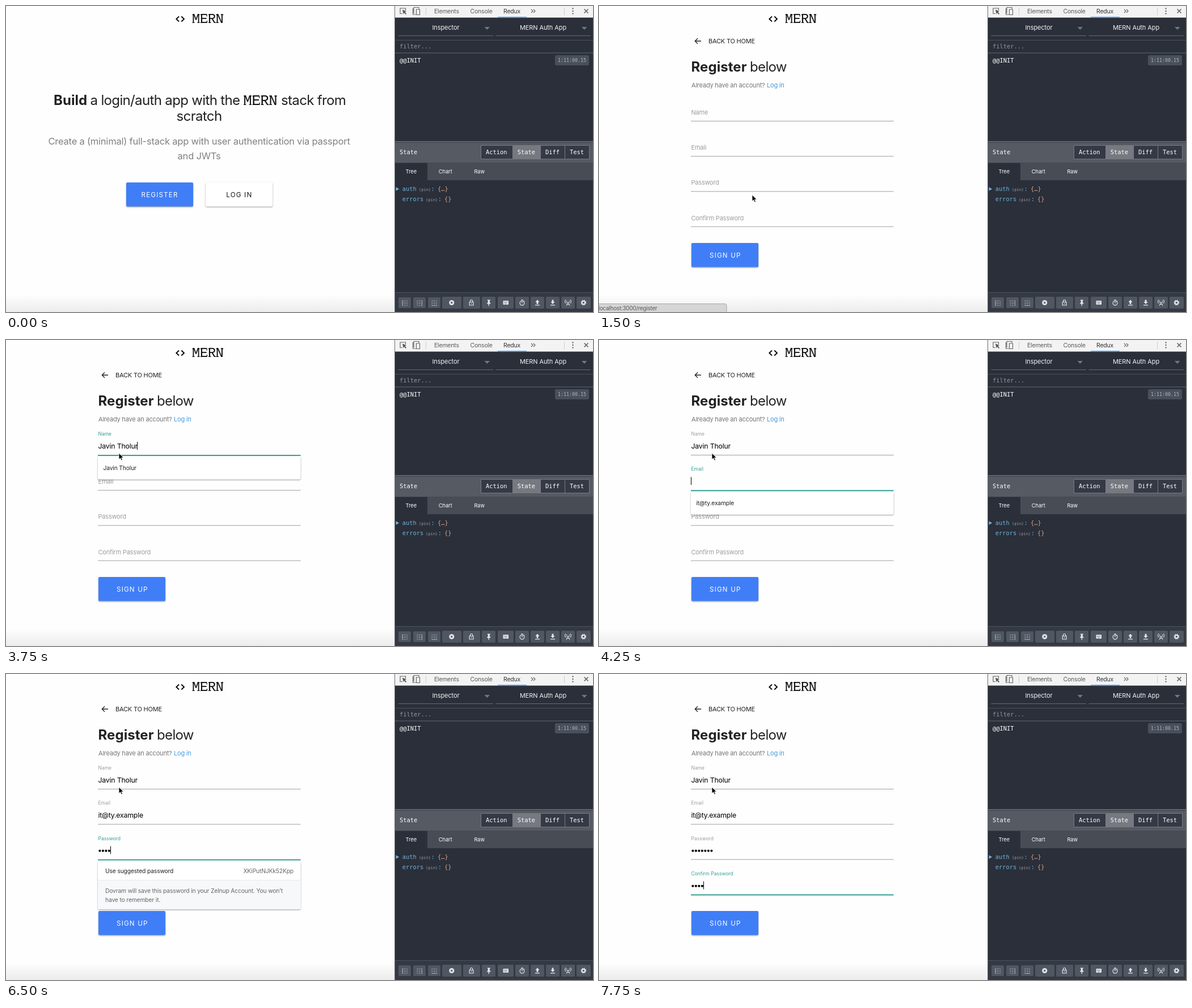
Animation of 1035 by 541 pixels, one loop 8000 ms. Source, as an HTML page:

```html
<!DOCTYPE html>
<html lang="en">
<head>
<meta charset="utf-8">
<title>Register demo</title>
<style>
html, body { margin: 0; width: 100%; height: 100%; overflow: hidden; background: #fefefe; }
svg { display: block; width: 100vw; height: 100vh; }
text { font-family: Inter, "Open Sans", sans-serif; font-optical-sizing: none; white-space: pre; }
.mid { text-anchor: middle; }
.end { text-anchor: end; }
.logo { font: 25px "Liberation Mono", monospace; fill: #111; }
.title { font-size: 24px; letter-spacing: -.027em; fill: #212121; }
.bold { font-weight: 700; letter-spacing: .003em; }
.sub { font-size: 16.5px; letter-spacing: -.0125em; fill: #808080; }
.btn { font-size: 11.6px; letter-spacing: 1.2px; fill: #fff; }
.small { font-size: 11px; letter-spacing: -.2px; fill: #757575; }
.card { fill: #fff; filter: drop-shadow(0 1px 1px #0004) drop-shadow(0 1px 1px #0002); }
.blue { fill: #407ef7; }
.hover { filter: drop-shadow(0 2px 2px #0004) drop-shadow(0 2px 4px #0003); }
.label { fill: #9e9e9e; }
.value { font-size: 12.3px; letter-spacing: -.2px; fill: #000; }
.hint { font-size: 10.3px; letter-spacing: -.15px; fill: #202124; }
.grey { fill: #63676c; }
.rule { stroke: #9e9e9e; }
.focus .rule { stroke: #35a096; stroke-width: 2; }
.focus .label { fill: #35a096; }
.up .label { font-size: 8.5px; letter-spacing: 0; }
.tab { font-size: 10.5px; letter-spacing: -.2px; fill: #5a5a5a; }
.head { font-size: 11px; letter-spacing: -.1px; fill: #f2f2f2; }
.view { font-size: 9.2px; fill: #fff; }
.mono text { font: 10.4px "DejaVu Sans Mono", monospace; fill: #fff; }
.mono .pin { font-size: 7px; fill: #9a9ea6; }
.mono .key { fill: #6fb3d9; }
.mono .obj { fill: #d9a184; }
.mono .dim { fill: #92969e; }
.mono .time { font-size: 8.3px; fill: #b0b4bb; }
.line { fill: none; stroke: currentColor; }
</style>
</head>
<body>
<svg viewBox="0 0 1035 541" preserveAspectRatio="none">
  <defs>
    <linearGradient id="fade" x2="0" y2="1">
      <stop stop-color="#fefefe"/><stop offset="1" stop-color="#ececec"/>
    </linearGradient>
    <g id="mern">
      <text class="logo">MERN</text>
      <path d="M.5-.7h4.5m5 0h4.5M.5-15.8h3m8 0h3M16-.7h2.5M16-15.8h2.5M28.4-.7v-3.5M28-15.8v3.5
        M31-.7h5m6 0h3M31-15.8h2.500M45.500-.7h5M45.500-15.8h2.500m6.500 0h5" class="line" color="#111" stroke-width="1.300"/>
    </g>
  </defs>
  <rect width="686" height="541" fill="#fefefe"/>
  <rect y="510" width="686" height="31" fill="url(#fade)"/>
  <path d="M305 18.5L300.3 23l4.7 4.5M309.3 18.5L314 23l-4.7 4.5" class="line" stroke-width="1.8"/>
  <use href="#mern" transform="translate(328 30) scale(.93)"/>

  <g id="home">
    <text x="84" y="175" class="title bold">Build</text>
    <text x="148.5" y="175" class="title">a login/auth app with the</text>
    <use href="#mern" x="418.5" y="175"/>
    <text x="485" y="175" class="title">stack from</text>
    <text x="340.5" y="203" class="title mid">scratch</text>
    <text x="340.5" y="245" class="sub mid">Create a (minimal) full-stack app with user authentication via passport</text>
    <text x="340.5" y="271" class="sub mid">and JWTs</text>
    <rect id="go" x="212" y="312" width="118" height="42.5" rx="2" class="card blue"/>
    <text x="238.5" y="338" class="btn">REGISTER</text>
    <rect x="352" y="312" width="118" height="42.5" rx="2" class="card"/>
    <text x="388.3" y="338" class="btn" style="fill:#111">LOG IN</text>
  </g>

  <g id="form">
    <path d="M180 62H169.5M174 57.3L169.3 62l4.7 4.7" class="line" color="#222" stroke-width="1.3"/>
    <text x="193" y="66.3" class="small" style="fill:#222">BACK TO HOME</text>
    <text x="162.5" y="116" class="title bold">Register</text>
    <text x="266" y="116" class="title">below</text>
    <text x="163" y="144.3" class="small">Already have an account?</text>
    <text x="296" y="144.3" class="small" style="fill:#459bdc">Log in</text>
    <g id="fields"></g>
    <rect x="163" y="419" width="118" height="42.5" rx="2" class="card blue"/>
    <text x="195" y="444.7" class="btn">SIGN UP</text>
    <g id="popups">
      <g>
        <rect x="162" y="206" width="357.5" height="40.5" rx="2" class="card"/>
        <text x="171.5" y="230" class="hint">Javin Tholur</text>
      </g>
      <g>
        <rect x="162" y="268.2" width="357.5" height="40.5" rx="2" class="card"/>
        <text x="171.5" y="292.2" class="hint">it@ty.example</text>
      </g>
      <g>
        <rect x="162" y="331" width="357.5" height="85" rx="2" class="card"/>
        <path d="M162 365h357.5v49a2 2 0 0 1-2 2h-353.5a2 2 0 0 1-2-2z" fill="#f7f8f9"/>
        <path d="M162 364.5h357.5" class="line" color="#e8e8e8"/>
        <text x="175" y="351.5" class="hint">Use suggested password</text>
        <text x="507" y="351.5" class="hint grey end">XKiPutNJKk52Kpp</text>
        <text x="175" y="387" class="hint grey">Dovram will save this password in your Zelnup Account. You won’t</text>
        <text x="175" y="402.7" class="hint grey">have to remember it.</text>
      </g>
    </g>
  </g>

  <g id="status">
    <path d="M-1 526.5H222a3 3 0 0 1 3 3V542H-1z" fill="#d6d6d6" stroke="#a8a8a8"/>
    <text x="-1" y="537.7" font-size="9.7" letter-spacing="-.15" fill="#555">localhost:3000/register</text>
  </g>
  <path id="mouse" d="M0 0V11.2L2.6 8.8 4.5 13 6.4 12.2 4.6 8.1H8.2Z" stroke="#fff" stroke-width=".8"/>

  <g id="panel">
    <rect x="685" width="350" height="541" fill="#2a2f3a"/>
    <rect x="685" width="350" height="20.5" fill="#f3f3f3"/>
    <path d="M685.5 0V541" class="line" color="#6b6e74"/>
    <g color="#666" stroke-width="1.2">
      <path d="M704.5 8V4H695v9.5h4" class="line"/>
      <path d="M699 6.5l7 3-2.6 1.2 2.8 3-1.3 1.2-2.8-3-1.4 2.4z" fill="#555"/>
      <path d="M719 13V2.5h9V5M717.5 4v11h5M723.5 6h6v9.5h-6z" class="line"/>
      <path d="M926 6l3 3-3 3M930 6l3 3-3 3" class="line"/>
      <path d="M1019.5 5.5l7 7m0-7l-7 7" class="line" stroke-width="1.7"/>
      <path d="M999.5 4.5v.01M999.5 9v.01M999.5 13.5v.01" class="line" stroke-width="2.4" stroke-linecap="round"/>
      <path d="M740.5 3v13M984.5 3v13" class="line" color="#ccc" stroke-width="1"/>
    </g>
    <text x="755" y="13" class="tab">Elements</text>
    <text x="818.5" y="13" class="tab">Console</text>
    <text x="877" y="13" class="tab" style="fill:#333">Redux</text>
    <rect x="867" y="19" width="51" height="2" fill="#4a9df0"/>

    <text x="775.5" y="42" class="head mid">Inspector</text>
    <text x="947" y="42" class="head mid">MERN Auth App</text>
    <path d="M843.5 37h9.5l-4.7 5zM1015 37h9.5l-4.7 5z" fill="#737780"/>
    <path d="M691.5 52.5H859M863.5 52.5H1031" class="line" color="#666a73"/>
    <path d="M686 60.5h349" class="line" color="#4a4f59"/>
    <path d="M686 83h349" class="line" color="#646871"/>
    <rect x="968" y="87" width="60" height="18" rx="2.5" fill="#4a505b"/>

    <rect x="686" y="239" width="349" height="38.5" fill="#565a62"/>
    <path d="M686 239.5h349" class="line" color="#777a80"/>
    <path d="M686 241h349" class="line" color="#3b3f48"/>
    <rect x="837.5" y="246.5" width="191" height="24" fill="#343945"/>
    <rect x="893" y="246.5" width="49" height="24" fill="#767980"/>
    <path d="M837.5 246.5h191v24h-191zM893.5 246.5v24M942.5 246.5v24M985.5 246.5v24" class="line" color="#777a81"/>
    <rect x="686" y="277.5" width="349" height="30.5" fill="#484c55"/>
    <rect x="686" y="277.5" width="57" height="30.5" fill="#2a2f3a"/>
    <text x="714.3" y="296.3" class="view mid">Tree</text>
    <text x="774.7" y="296.3" class="view mid">Chart</text>
    <text x="834.7" y="296.3" class="view mid">Raw</text>

    <g class="mono">
      <text x="694" y="75" class="dim">filter...</text>
      <text x="694" y="100">@@INIT</text>
      <text x="998" y="98.7" class="time mid">1:11:00.15</text>
      <text x="694" y="262">State</text>
      <text x="864.7" y="262" class="mid">Action</text>
      <text x="917.3" y="262" class="mid">State</text>
      <text x="963.5" y="262" class="mid">Diff</text>
      <text x="1006.5" y="262" class="mid">Test</text>
      <path d="M687.5 320.3v6.4l5.7-3.2z" fill="#6fb3d9"/>
      <text x="698.8" y="327" class="key">auth</text>
      <text x="728" y="327" class="pin">(pin)</text>
      <text x="749.5" y="327" class="key">:</text>
      <text x="761" y="327" class="obj">{…}</text>
      <text x="698.8" y="345" class="key">errors</text>
      <text x="740" y="345" class="pin">(pin)</text>
      <text x="761.8" y="345" class="key">:</text>
      <text x="773" y="345" class="obj">{}</text>
    </g>

    <rect x="686" y="506" width="349" height="35" fill="#343944"/>
    <path d="M686 506.5h349" class="line" color="#4d525c"/>
    <g id="keys" fill="#505762"></g>
    <g color="#e8e9eb" fill="#e8e9eb" stroke-width="1.2">
      <g color="#a9adb4" stroke-width="1">
        <path d="M699 521h8.5v8.5H699zM703.3 521v8.5M699 525.3h8.5M725 521h8.5v8.5H725zM729.3 521v8.5M725 525.3h8.5
          M751 521h8.5v8.5H751zM755.3 521v8.5M751 525.3h8.5" class="line" stroke-dasharray="1 1.2"/>
        <path d="M699 520.5v9.5M733.5 520.5v9.5M750.5 529.5h9.5" class="line"/>
      </g>
      <circle cx="785.8" cy="524.5" r="4.5"/>
      <path d="M784.3 523l3 3m0-3l-3 3" class="line" color="#505762"/>
      <path d="M817.2 523.5h6.8v5.5h-6.8zM818.6 523.5v-2a2 2 0 0 1 4 0v2M820.6 525.5v1.5" class="line"/>
      <path d="M848.8 519.5h5v1l-1 .8v2.7l1.7 1.5v1h-2.5v3l-.7 1-.7-1v-3h-2.5v-1l1.7-1.5v-2.7l-1-.8z"/>
      <rect x="876.5" y="521" width="9.5" height="7" rx="1"/>
      <path d="M878 523h6.5M878 524.8h6.5M879.5 526.7h3.5" class="line" color="#505762" stroke-width=".9" stroke-dasharray="1 .6"/>
      <circle cx="910" cy="525.3" r="3.9" class="line"/>
      <path d="M908.5 519.7h3M910 525.5v-2.7M913 521.5l1 1" class="line"/>
      <path d="M937 519.5l3.6 4h-2.2v3.5h-2.8v-3.5h-2.2zM933 528.2h8v1.4h-8z"/>
      <path d="M964 527l3.6-4h-2.2v-3.5h-2.8v3.5h-2.2zM960 528.2h8v1.4h-8z"/>
      <path d="M988 530l3-7 3 7M989 527.5h4M988.7 524.5a3 3 0 0 1 0-4M993.3 524.5a3 3 0 0 0 0-4
        M986.7 526a5.5 5.5 0 0 1 0-7M995.3 526a5.5 5.5 0 0 0 0-7" class="line" stroke-width="1"/>
      <circle cx="1018.3" cy="524.5" r="2.7" class="line" stroke-width="2"/>
      <circle cx="1018.3" cy="524.5" r="4.2" class="line" stroke-width="1.5" stroke-dasharray="1.65 1.65"/>
    </g>
  </g>
</svg>
<script>
const LOOP = 8000, STEP = 250, PITCH = 62.2, DOT = 5.5;
const $ = id => document.getElementById(id);
const show = (el, on) => el.setAttribute('visibility', on ? 'inherit' : 'hidden');

// from: step of focus; start: step of the first key; typed: characters shown at each step after it
const fields = [
  { label: 'Name', text: 'Javin Tholur', from: 9, start: 11, typed: [2, 5, 7, 9, 12] },
  { label: 'Email', text: 'it@ty.example', from: 16, start: 18, typed: [2, 4, 6, 8, 10, 13] },
  { label: 'Password', from: 24, start: 25, typed: [2, 4, 6, 7] },
  { label: 'Confirm Password', from: 29, start: 30, typed: [1, 4] }
];
const popups = [[10, 16], [17, 24], [24, 29]];
const path = [[312, 236], [300, 268], [281, 318], [270, 334], [270, 334], [270, 334], [250, 290], [208, 214], [199, 200]];
const keys = [[692, 22], [718, 22], [744, 22], [769, 34], [806, 30], [839, 24], [867, 28],
  [898, 24], [925, 24], [952, 24], [979, 24], [1006, 25]];

$('keys').innerHTML = keys.map(([x, w], i) =>
  `<rect x="${x}" y="${i < 3 ? 515 : 514}" width="${w}" height="${i < 3 ? 19 : 21}" rx="2"/>`).join('');

$('fields').innerHTML = fields.map((f, i) => `<g transform="translate(0 ${i * PITCH})">
  <path class="rule" d="M162 203.5H519.5"/>
  <text class="small label" x="162.5" y="192">${f.label}</text>
  <text class="value" x="162.5" y="191.5"></text>
  <line class="dots" x1="165.4" y1="188.2" y2="188.2" stroke="#000" stroke-width="4.2"
    stroke-linecap="round" stroke-dasharray="0 ${DOT}"/>
  <path class="caret" d="M0 180v14" stroke="#000"/></g>`).join('');

fields.forEach((f, i) => {
  f.el = $('fields').children[i];
  for (const part of ['rule', 'label', 'value', 'dots', 'caret']) f[part] = f.el.querySelector('.' + part);
  f.until = i < 3 ? fields[i + 1].from : Infinity;
});

function drawField(f, k) {
  const focus = k >= f.from && k < f.until, up = k >= f.from;
  const n = k < f.start ? 0 : f.typed[Math.min(k - f.start, f.typed.length - 1)];
  f.el.setAttribute('class', (up ? 'up ' : '') + (focus ? 'focus' : ''));
  f.label.setAttribute('y', up ? 169.3 : 192);
  f.rule.setAttribute('d', `M162 ${focus ? 204 : 203.5}H519.5`);
  let width = n * DOT;
  if (f.text) {
    f.value.textContent = f.text.slice(0, n);
    width = n ? f.value.getComputedTextLength() : 0;
  }
  f.dots.setAttribute('x2', 165.4 + (n - 1) * DOT + .1);
  show(f.dots, !f.text && n > 0);
  f.caret.setAttribute('transform', `translate(${Math.round(162 + width) + .5} 0)`);
  show(f.caret, focus);
}

function draw(k) {
  const home = k < 6;
  show($('home'), home);
  show($('form'), !home);
  $('go').classList.toggle('hover', k >= 3 && home);
  show($('status'), k === 5 || k === 6);
  const [x, y] = path[Math.min(Math.max(k, 1), path.length) - 1];
  $('mouse').setAttribute('transform', `translate(${x} ${y})`);
  show($('mouse'), k > 0);
  fields.forEach(f => drawField(f, k));
  popups.forEach(([a, b], i) => show($('popups').children[i], k >= a && k < b));
}

const origin = performance.now();
let last = -1;
function tick() {
  const k = Math.floor((performance.now() - origin) % LOOP / STEP);
  if (k !== last) draw(last = k);
  requestAnimationFrame(tick);
}
tick();
</script>
</body>
</html>
```
